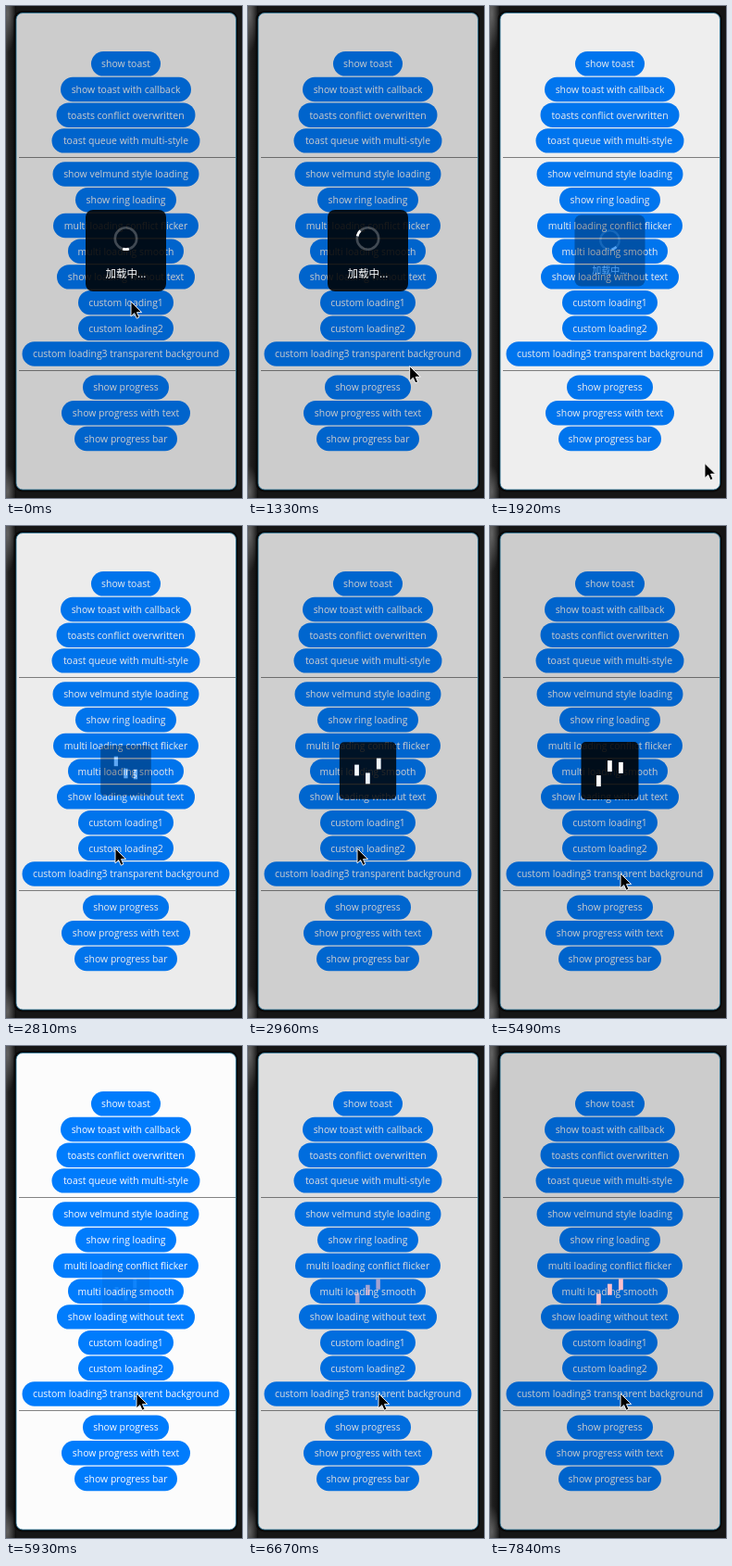
Write an HTML page that moves like this. It is 255 px wide and 531 px high and loops after 7990 ms.

```html
<!DOCTYPE html>
<html lang="en">
<head>
<meta charset="utf-8">
<title>Loading dialogs</title>
<style>
  html, body { margin: 0; width: 100%; height: 100%; overflow: hidden; background: #161616; }
  svg { display: block; width: 100%; height: 100%; }
  text { fill: #fff; text-anchor: middle; }
  #buttons text { font: 10.45px "Open Sans", "Noto Sans", sans-serif; }
  #buttons rect { fill: #007dff; }
  #spinner text { font: 11.5px "Noto Sans CJK SC", "Noto Sans CJK", sans-serif; }
</style>
</head>
<body>
<svg viewBox="0 0 255 531">
  <defs>
    <linearGradient id="side">
      <stop offset="0" stop-color="#383838"/>
      <stop offset=".25" stop-color="#202020"/>
      <stop offset="1" stop-color="#0c0c0c"/>
    </linearGradient>
    <radialGradient id="shine">
      <stop offset="0" stop-color="#777"/>
      <stop offset="1" stop-color="#777" stop-opacity="0"/>
    </radialGradient>
  </defs>
  <rect width="255" height="531" fill="#161616"/>
  <rect width="11" height="531" fill="url(#side)"/>
  <ellipse cx="2" cy="8" rx="9" ry="42" fill="url(#shine)" opacity=".75"/>
  <ellipse cx="2" cy="524" rx="9" ry="28" fill="url(#shine)" opacity=".7"/>
  <rect x="8.5" y="5" width="242" height="519.5" rx="9" fill="#080808"/>
  <rect x="11" y="7.5" width="237.5" height="514.5" rx="7" fill="#fff"/>
  <path d="M14 163.5H248M14 393.5H248" stroke="#858585"/>
  <g id="buttons"></g>
  <rect id="shade" x="11" y="7.5" width="237.5" height="514.5" rx="7"/>
  <rect x="11" y="7.5" width="237.5" height="514.5" rx="7" fill="none" stroke="#236f94" stroke-width=".8"/>
  <g id="spinner">
    <rect x="-43.5" y="-44" width="87" height="88" rx="8" fill-opacity=".87"/>
    <circle cy="-13" r="11.7" fill="none" stroke="#fff" stroke-opacity=".25" stroke-width="2.6"/>
    <path id="arc" d="M-3.3 -1.8A11.7 11.7 0 0 0 3.3 -1.8" fill="none" stroke="#fff" stroke-width="2.8"/>
    <text y="29">加载中...</text>
  </g>
  <g id="boxedBars">
    <rect x="-31" y="-31" width="62" height="62" rx="5" fill-opacity=".87"/>
    <g class="bars" fill="#fff"></g>
  </g>
  <g id="plainBars"><g class="bars" fill="#ffc0cb"></g></g>
  <path id="cursor" d="M0 0V16L3.7 12.6 6.2 18.2 8.9 17 6.5 11.6H11.6Z" stroke="#fff" stroke-width=".9"/>
</svg>
<script>
const LOOP = 7990, TICK = 148, FADE = 260, BAR_PERIOD = 588;
const byId = id => document.getElementById(id);

function add(parent, tag, attrs, text = "") {
  const node = document.createElementNS("http://www.w3.org/2000/svg", tag);
  for (const name in attrs) node.setAttribute(name, attrs[name]);
  node.textContent = text;
  parent.append(node);
  return node;
}

// label, centre y, width
[
  ["show toast", 62.3, 75],
  ["show toast with callback", 90, 141],
  ["toasts conflict overwritten", 117.7, 150],
  ["toast queue with multi-style", 145.4, 160],
  ["show velmund style loading", 181.5, 158],
  ["show ring loading", 209.2, 109],
  ["multi loading conflict flicker", 237, 157],
  ["multi loading smooth", 264.7, 125],
  ["show loading without text", 292.4, 149],
  ["custom loading1", 320.1, 103],
  ["custom loading2", 347.8, 103],
  ["custom loading3 transparent background", 375.5, 224],
  ["show progress", 411.6, 93],
  ["show progress with text", 439.3, 139],
  ["show progress bar", 467, 111]
].forEach(([label, y, width]) => {
  add(byId("buttons"), "rect", { x: 129.5 - width / 2, y: y - 13.2, width, height: 26.4, rx: 13.2 });
  add(byId("buttons"), "text", { x: 129.5, y: y + 3.8 }, label);
});

// phase is the first bar's position in its cycle at phaseTime
const dialogs = [
  { node: byId("spinner"), open: -1000, close: 1752 },
  { node: byId("boxedBars"), open: 2716, close: 5675, phaseTime: 2960, phase: .24 },
  { node: byId("plainBars"), open: 6491, close: 9000, phaseTime: 6660, phase: .43 }
];
for (const dialog of dialogs) {
  const group = dialog.node.querySelector(".bars");
  dialog.bars = group
    ? [0, 1, 2].map(i => add(group, "rect", { x: -14.5 + 12 * i, width: 4.8, height: 12 }))
    : [];
}

// time, x, y
const cursorPath = [
  [0, 135, 319], [440, 135, 319], [1184, 144, 344], [1628, 236, 478], [1776, 232, 493.5],
  [1930, 232, 493.5], [2360, 118, 348], [3400, 118, 348], [4200, 143, 366.5],
  [4736, 141, 375], [LOOP, 141, 375]
];

const clamp = x => Math.max(0, Math.min(1, x));
const mix = (a, b, k) => a + (b - a) * k;

function cursorAt(t) {
  const i = cursorPath.findIndex(point => point[0] > t);
  const [t0, x0, y0] = cursorPath[i - 1], [t1, x1, y1] = cursorPath[i];
  const k = (t - t0) / (t1 - t0);
  return `translate(${mix(x0, x1, k)} ${mix(y0, y1, k)})`;
}

function bounce(phase) {
  const p = phase - Math.floor(phase);
  return 1 - Math.abs(2 * p - 1);
}

function draw(t) {
  let shade = 0;
  for (const { node, open, close, phaseTime, phase, bars } of dialogs) {
    const shown = clamp((t - open) / FADE) - clamp((t - close) / FADE);
    shade = Math.max(shade, shown);
    node.setAttribute("opacity", shown);
    node.setAttribute("transform", `translate(129.5 264) scale(${.81 + .19 * shown})`);
    bars.forEach((bar, i) =>
      bar.setAttribute("y", -18 + 24 * bounce(phase + (t - phaseTime) / BAR_PERIOD + i / 3)));
  }
  byId("shade").setAttribute("opacity", .2 * shade);
  byId("arc").setAttribute("transform", `rotate(${t * .36} 0 -13)`);
  byId("cursor").setAttribute("transform", cursorAt(t));
}

function frame() {
  const t = performance.now() % LOOP;
  draw(Math.min(53, Math.floor((t + 9) / TICK)) * TICK);
  requestAnimationFrame(frame);
}
frame();
</script>
</body>
</html>
```
